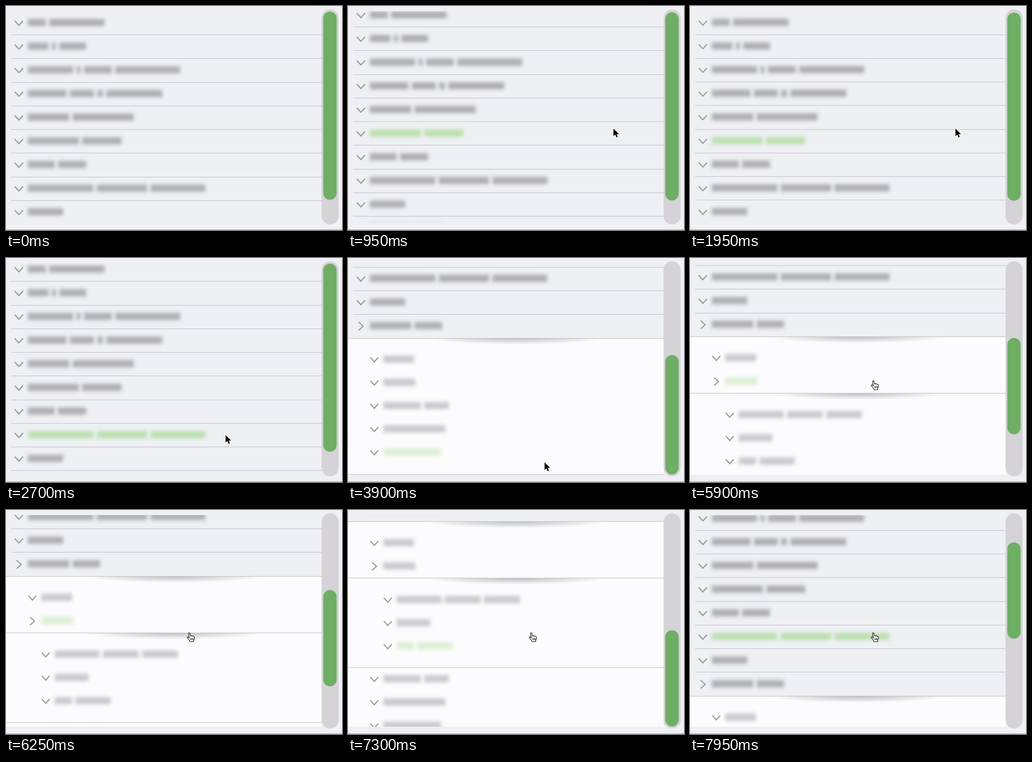
Recreate the animation shown at these times as an HTML page with a canvas. Size 600 by 400 pixels, loop 8000 ms.

```html
<!DOCTYPE html>
<html lang="en">
<head>
<meta charset="utf-8">
<title>Nested accordion scroll</title>
<style>
  html, body { margin: 0; width: 100%; height: 100%; overflow: hidden; background: #eff0f4; }
  canvas { display: block; }
</style>
</head>
<body>
<canvas id="stage" width="600" height="400"></canvas>
<script>
const ctx = document.getElementById('stage').getContext('2d');
const LOOP = 8000, LAG = 55;
const VIEW = { top: 9, bottom: 386, right: 564 };
const TRACK = { top: 10, length: 376.5 };
const ROW = 42.25, SUB_ROW = 41.5, PANEL_TOP = 431.5, PANEL_HEIGHT = 243.5, NESTED_HEIGHT = 160;

// Each label is a list of blurred word widths.
const mainLabels = [
  [32, 99], [37, 7, 48], [81, 7, 50, 116], [69, 43, 10, 100], [74, 109],
  [91, 70], [48, 50], [117, 90, 98], [63], [74, 49]
];
const subLabels = [[55], [57], [67, 44], [111], [103]];
const nestedLabels = [[80, 64, 64], [60], [31, 63]];

// Steps are [start, end, destination], eased out.
const scrollSteps = [
  [890, 1260, 45.5], [1500, 2000, 0], [2650, 3100, 45.5], [3500, 3850, 289],
  [5300, 5800, 291.5], [6200, 6900, 449], [7260, 8000, 98]
];
const pointerX = [[250, 750, 474], [2300, 3250, 351], [4350, 5000, 323]];
const pointerY = [[250, 750, 219], [2300, 3250, 365], [4350, 5000, 219]];
const openMain = [[3450, 3750, 1]];
const openSub = [[5200, 5500, 1]];

function follow(steps, start, t) {
  let value = start;
  for (const [from, to, target] of steps) {
    if (t <= from) break;
    const rest = 1 - Math.min(1, (t - from) / (to - from));
    value = target + (value - target) * rest * rest;
  }
  return value;
}

function layout(t) {
  const main = follow(openMain, 0, t);
  const nested = follow(openSub, 0, t) * NESTED_HEIGHT;
  const panel = main * (PANEL_HEIGHT + nested);
  const limit = PANEL_TOP + panel - VIEW.bottom;
  return { main, nested, panel, scroll: Math.min(follow(scrollSteps, 0, t), limit) };
}

function rowsOf({ main, nested, scroll }) {
  const rows = [];
  mainLabels.forEach((words, i) => rows.push({
    words, level: 0, y: 29.5 + i * ROW - scroll, open: i === 9 && main > 0
  }));
  const top = PANEL_TOP - scroll;
  if (main > 0) subLabels.forEach((words, i) => rows.push({
    words, level: 1, y: top + 38 + i * SUB_ROW + (i > 1 ? nested : 0), open: i === 1 && nested > 0
  }));
  if (nested > 0) nestedLabels.forEach((words, i) => rows.push({
    words, level: 2, y: top + 101 + 38.5 + i * SUB_ROW, open: false
  }));
  return rows;
}

function line(y, left) {
  ctx.fillStyle = '#c3c4c9';
  ctx.fillRect(left, Math.round(y), VIEW.right - left, 1);
}

function clipped(top, bottom, paint) {
  ctx.save();
  ctx.beginPath();
  ctx.rect(0, top, VIEW.right, Math.max(0, bottom - top));
  ctx.clip();
  paint();
  ctx.restore();
}

function innerShadow(y) {
  ctx.save();
  ctx.translate(300, y);
  ctx.scale(1, 0.075);
  const fade = ctx.createRadialGradient(0, 0, 0, 0, 0, 160);
  fade.addColorStop(0, 'rgba(70,75,80,.34)');
  fade.addColorStop(0.5, 'rgba(70,75,80,.18)');
  fade.addColorStop(1, 'rgba(70,75,80,0)');
  ctx.fillStyle = fade;
  ctx.fillRect(-160, 0, 320, 160);
  ctx.restore();
}

function drawRow({ words, level, y, open }, hovered) {
  if (y < -15 || y > 410) return;
  const left = 23 + level * 24;
  const size = level ? 7 : 7.5;
  ctx.strokeStyle = '#98989d';
  ctx.lineWidth = 2;
  ctx.beginPath();
  if (open) {
    ctx.moveTo(left - 4, y + 1 - size);
    ctx.lineTo(left + 4, y + 1);
    ctx.lineTo(left - 4, y + 1 + size);
  } else {
    ctx.moveTo(left - size, y - 3);
    ctx.lineTo(left, y + 5);
    ctx.lineTo(left + size, y - 3);
  }
  ctx.stroke();

  ctx.save();
  ctx.filter = 'blur(3px)';
  ctx.fillStyle = hovered ? (level ? '#dcf0d4' : '#bce0b0') : (level ? '#cbcace' : '#b0b0b3');
  let x = left + 16;
  for (const width of words) {
    ctx.fillRect(x, y - 6.5, width, 13);
    x += width + 6;
  }
  ctx.restore();
}

function drawContent(state, hoveredIndex) {
  const { main, nested, panel, scroll } = state;
  const rows = rowsOf(state);
  const top = PANEL_TOP - scroll, bottom = top + panel;
  const drawLevel = level => rows.forEach((row, i) => {
    if (row.level === level) drawRow(row, i === hoveredIndex);
  });

  for (let i = 0; i < 9; i++) line(51 + i * ROW - scroll, 9);
  drawLevel(0);
  if (!main) return line(top, 9);
  clipped(Math.max(top, VIEW.top), Math.min(bottom, VIEW.bottom + 1), () => {
    ctx.fillStyle = '#fcfbfd';
    ctx.fillRect(0, top, VIEW.right, panel);
    innerShadow(top);
    drawLevel(1);
    if (nested) {
      const inner = top + 101;
      clipped(inner, inner + nested, () => {
        innerShadow(inner);
        drawLevel(2);
      });
      line(inner, 0);
      line(inner + nested, 0);
    }
  });
  line(top, 0);
  line(bottom, 0);
}

function pill(x, y, width, height, color) {
  ctx.fillStyle = color;
  ctx.beginPath();
  ctx.roundRect(x, y, width, height, width / 2);
  ctx.fill();
}

function drawScrollbar({ scroll, panel }) {
  const content = PANEL_TOP + panel - VIEW.top;
  const scale = TRACK.length / content;
  pill(563.5, 6, 30.5, 384, '#d5d3d7');
  pill(566.5, TRACK.top + scroll * scale, 24, (VIEW.bottom - VIEW.top) * scale, '#6fae65');
}

const arrow = new Path2D('M0 0V13.5L3.2 10.6 5.4 15.6 7.8 14.5 5.6 9.7H10Z');
const hand = new Path2D('M3 1.5C3 0 5.2 0 5.5 1.5L6.5 6C7 4.8 8.7 5 9 6.3C9.8 5.3 11.2 5.7 11.4 6.9C12.4 6.2 13.4 7 13.4 8.2V11L12 14V16H5.5L4.5 13.5 1 9.5C0 8 1.8 7 3 8.2L4.4 9.3Z M7 10V13 M9 10V13 M11 10V13');

function drawPointer(x, y, isHand) {
  ctx.save();
  ctx.translate(x, y);
  ctx.lineJoin = 'round';
  ctx.lineWidth = isHand ? 1.1 : 1.6;
  ctx.strokeStyle = isHand ? '#111' : '#fff';
  ctx.fillStyle = isHand ? '#fff' : '#000';
  if (isHand) {
    ctx.fill(hand);
    ctx.stroke(hand);
  } else {
    ctx.stroke(arrow);
    ctx.fill(arrow);
  }
  ctx.restore();
}

function draw(t) {
  const late = layout(t - LAG);
  const x = follow(pointerX, 490, t), y = follow(pointerY, 402, t);
  // Hover and scrollbar trail the content slightly.
  const hovered = rowsOf(late).findLastIndex(row => {
    const half = (row.level ? SUB_ROW : ROW) / 2;
    return t > 250 && Math.abs(row.y - y - 2) <= half;
  });

  ctx.fillStyle = '#eff0f4';
  ctx.fillRect(0, 0, 600, 400);
  clipped(VIEW.top, VIEW.bottom + 1, () => drawContent(layout(t), hovered));
  ctx.fillStyle = '#b0b1b5';
  ctx.fillRect(0, 399, 600, 1);
  drawScrollbar(late);
  if (t > 250) drawPointer(x, y, t > 4600);
}

const started = performance.now();
function frame() {
  draw((performance.now() - started) % LOOP);
  requestAnimationFrame(frame);
}
frame();
</script>
</body>
</html>
```
